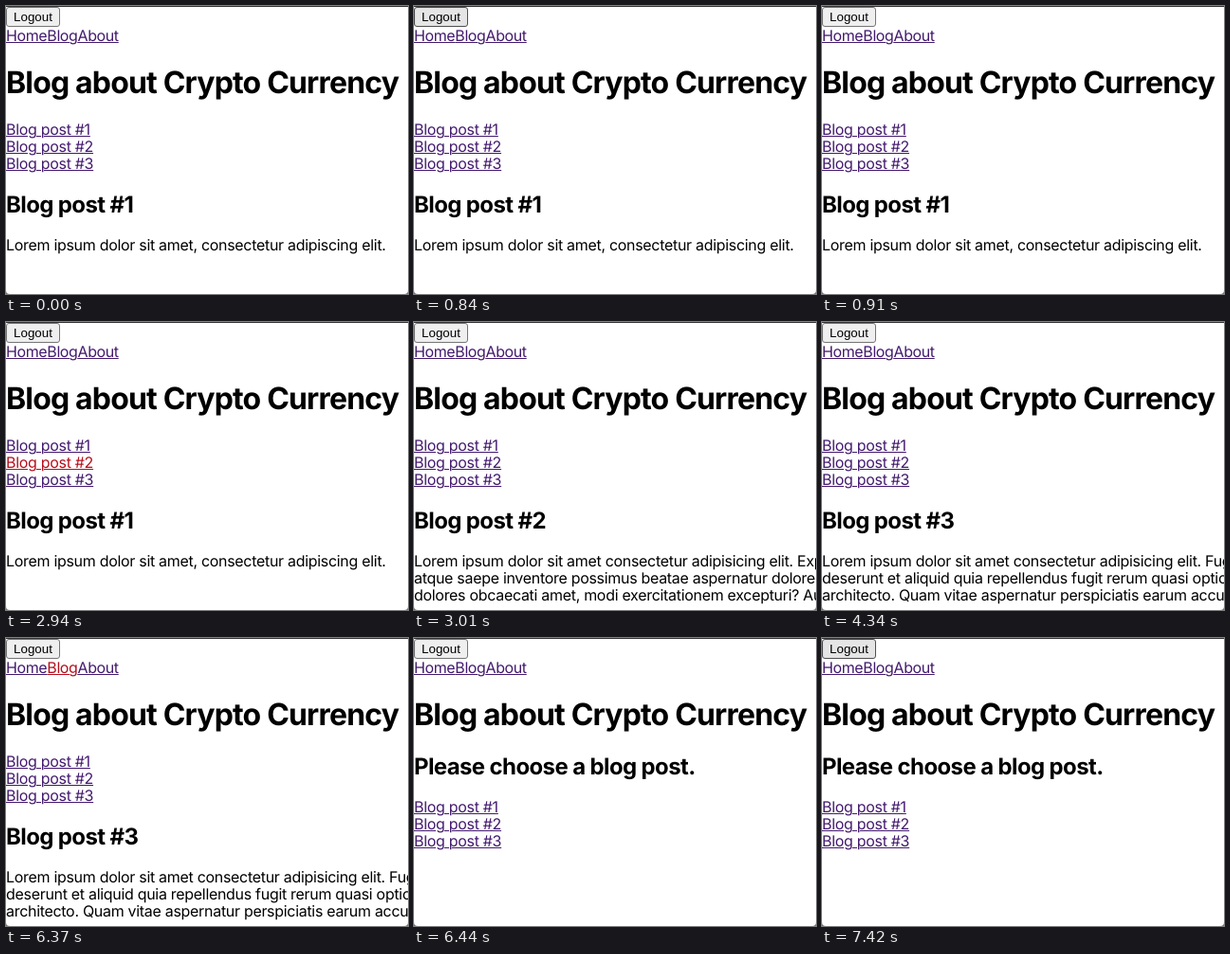
An HTML page for the animation above (8000 ms loop, 424 by 304 pixels).

```html
<!DOCTYPE html>
<html lang="en">
<head>
<meta charset="utf-8">
<title>Blog</title>
<style>
  html, body { margin: 0; width: 100%; height: 100%; overflow: hidden; background: #777; }
  #window {
    position: relative; width: 424px; height: 304px; box-sizing: border-box; overflow: hidden;
    border-top: 1px solid #333; border-radius: 0 0 4px 4px; background: #fff; color: #000;
    font: 16px/18px Inter, sans-serif; font-optical-sizing: none; letter-spacing: -0.019em;
    text-rendering: geometricPrecision; white-space: pre; cursor: default;
  }
  button {
    display: block; width: 57px; height: 21px; margin: 0; padding: 0; box-sizing: border-box;
    border: 1px solid #767676; border-radius: 3px; background: #efefef; color: #000;
    font: 13.333px/19px "Liberation Sans", Arial, sans-serif; letter-spacing: 0;
  }
  button.hover { border-color: #4f4f4f; background: #e5e5e5; }
  nav, li { height: 18px; }
  nav { letter-spacing: -0.024em; }
  ul { margin: 0; padding: 0; list-style: none; }
  a { color: #431a6e; text-decoration: underline 1px; text-underline-offset: 1px; }
  a.active { color: #b40f1c; }
  h1, h2 { font-weight: 700; letter-spacing: -0.026em; }
  h1 { margin: 21px 0; font-size: 32px; line-height: 39px; }
  h2 { margin: 20px 0 19px; font-size: 24px; line-height: 29px; }
  h1 + h2 { margin-top: 0; }
  p { margin: 0; }
</style>
</head>
<body>
<div id="window"></div>
<script>
const LOOP = 8000;
const posts = {
  1: "Lorem ipsum dolor sit amet, consectetur adipiscing elit.",
  2: `Lorem ipsum dolor sit amet consectetur adipisicing elit. Expedita
atque saepe inventore possimus beatae aspernatur doloremque
dolores obcaecati amet, modi exercitationem excepturi? Autem`,
  3: `Lorem ipsum dolor sit amet consectetur adipisicing elit. Fugiat
deserunt et aliquid quia repellendus fugit rerum quasi optio
architecto. Quam vitae aspernatur perspiciatis earum accusamus`
};

// Each step holds until the next; post 0 is the blog index.
const steps = [
  { at: 0, post: 1 },
  { at: 840, post: 1, hover: true },
  { at: 910, post: 1 },
  { at: 2940, post: 1, active: "Blog post #2" },
  { at: 3010, post: 2 },
  { at: 4270, post: 2, active: "Blog post #3" },
  { at: 4340, post: 3 },
  { at: 6370, post: 3, active: "Blog" },
  { at: 6440, post: 0 },
  { at: 7420, post: 0, hover: true }
];

function render({ post, active, hover }) {
  const link = label => `<a class="${label === active ? "active" : ""}">${label}</a>`;
  const nav = ["Home", "Blog", "About"].map(link).join("");
  const items = [1, 2, 3].map(n => `<li>${link("Blog post #" + n)}</li>`).join("");
  const list = `<ul>${items}</ul>`;
  const content = post
    ? `${list}<h2>Blog post #${post}</h2><p>${posts[post]}</p>`
    : `<h2>Please choose a blog post.</h2>${list}`;
  return `<button class="${hover ? "hover" : ""}">Logout</button>` +
    `<nav>${nav}</nav><h1>Blog about Crypto Currency</h1>${content}`;
}

const view = document.getElementById("window");
const start = performance.now();
let shown;

function tick() {
  const time = (performance.now() - start) % LOOP;
  const step = steps.findLast(s => s.at <= time);
  if (step !== shown) {
    view.innerHTML = render(step);
    shown = step;
  }
  requestAnimationFrame(tick);
}
tick();
</script>
</body>
</html>
```
